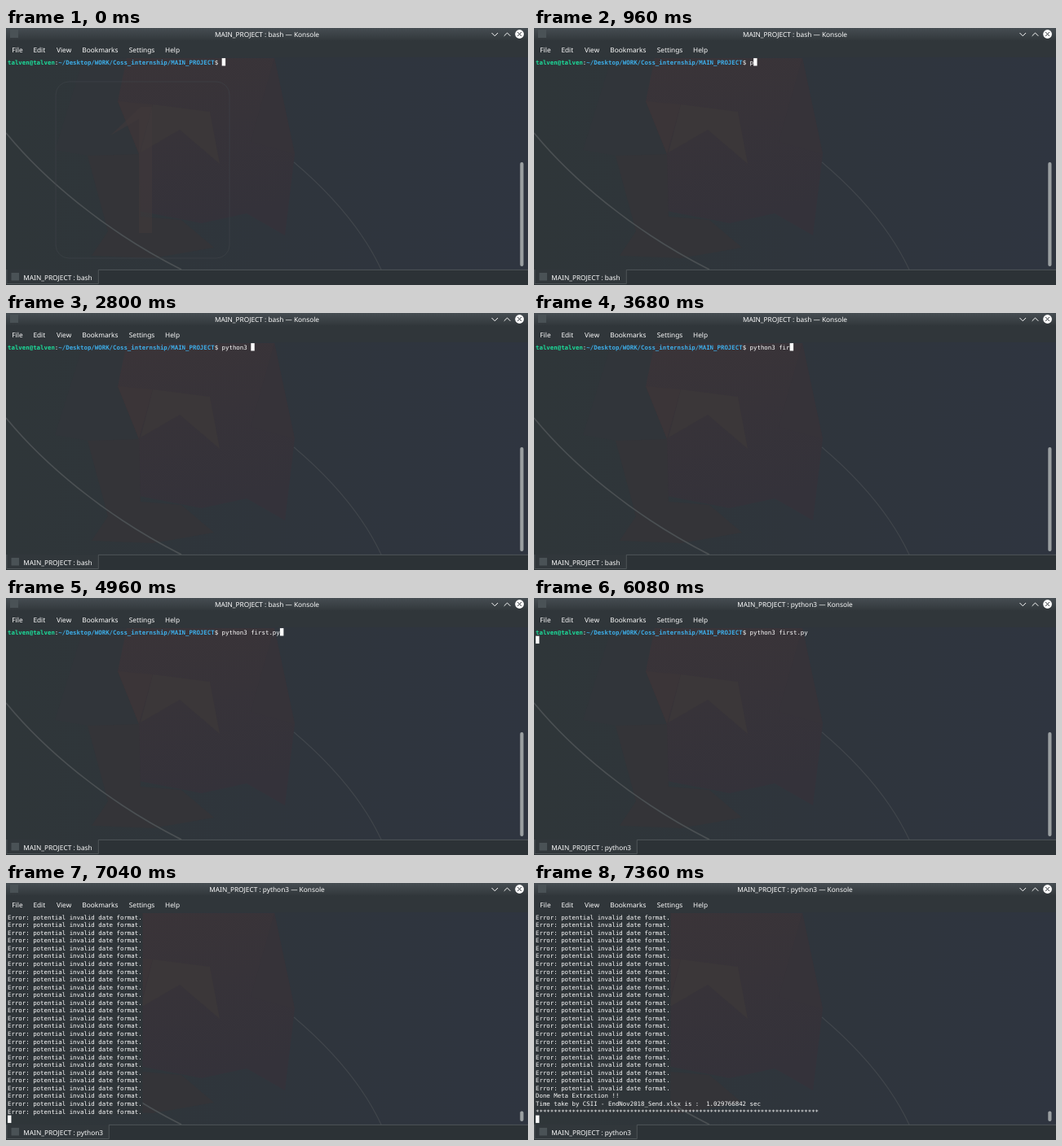
An HTML page that plays this animation: 640 px wide and 316 px high, repeating every 8 s.

```html
<!DOCTYPE html>
<html lang="en">
<head>
<meta charset="utf-8">
<title>Terminal session</title>
<style>
  html, body { margin: 0; width: 100%; height: 100%; overflow: hidden; background: #2f363a; }
  svg { display: block; width: 100%; height: 100%; }
  text { white-space: pre; text-rendering: geometricPrecision; fill: #fcfcfc; }
  .ui text { font: 8.3px "Noto Sans", sans-serif; }
  #rows text { font: 7.4px "DejaVu Sans Mono", monospace; }
  .user { fill: #1cdc9a; font-weight: bold; }
  .path { fill: #3daee9; font-weight: bold; }
</style>
</head>
<body>
<svg viewBox="0 0 640 316">
  <defs>
    <linearGradient id="bar" x2="0" y2="1">
      <stop stop-color="#464d52"/><stop offset="1" stop-color="#32383c"/>
    </linearGradient>
    <linearGradient id="wall">
      <stop stop-color="#2f3639"/><stop offset=".5" stop-color="#2f353c"/><stop offset="1" stop-color="#2f3540"/>
    </linearGradient>
    <linearGradient id="red" x2=".3" y2="1">
      <stop stop-color="#3a3438"/><stop offset="1" stop-color="#34323a"/>
    </linearGradient>
  </defs>

  <!-- wallpaper seen through the window -->
  <rect width="640" height="316" fill="#2f3639"/>
  <rect y="36" width="640" height="261" fill="url(#wall)"/>
  <path d="M95 37H150L137 90 163 155 100 157 60 150Z" fill="#31353a"/>
  <path d="M148 37H329L354 155 342 255 295 228 240 240 163 225V155L137 90Z" fill="url(#red)"/>
  <path d="M100 157L163 155 165 232 215 236 255 270 180 283 105 280 125 250Z" fill="#343438"/>
  <path d="M137 90L180 94 163 155Z" fill="#3b3538"/>
  <path d="M180 94L250 103 262 167 213 125 165 153Z" fill="#3b3739"/>
  <path d="M329 37L354 155 300 140Z" fill="#363339"/>
  <g fill="none">
    <path d="M0 129C45 184 120 249 215 297" stroke="#4b5053" stroke-width="1.7"/>
    <path d="M353 165C400 205 438 250 460 297" stroke="#41464c" stroke-width="1.1"/>
  </g>
  <g id="ghost">
    <rect x="61" y="66" width="213" height="217" rx="16" fill="none" stroke="#40454a" stroke-width=".6"/>
    <path d="M128 132L165 97H179V252H163V112Z" fill="#40393b" opacity=".6"/>
  </g>
  <rect id="flat" y="37" width="167.5" height="249" fill="#2f3539"/>

  <g class="ui">
    <rect width="640" height="15" fill="url(#bar)"/>
    <rect y="15" width="640" height="21" fill="#30363a"/>
    <rect x="5" y="2" width="10" height="10" fill="#4a5256"/>
    <text id="title" x="320" y="10.6" text-anchor="middle"></text>
    <g id="menu"></g>
    <g fill="none" stroke="#fcfcfc" stroke-width="1">
      <path d="M595.5 6L599.3 9.8 603.1 6M610.7 9.8L614.5 6 618.3 9.8"/>
      <circle cx="629.6" cy="7.5" r="5.4" fill="#fcfcfc" stroke="none"/>
      <path d="M627.2 5.1l4.8 4.8m0-4.8l-4.8 4.8" stroke="#31363b"/>
    </g>
    <rect y="297" width="640" height="19" fill="#2c3236"/>
    <path id="tab" fill="#31373b" stroke="#575d61" stroke-width=".8"/>
    <rect x="6.5" y="301" width="9.5" height="9.5" fill="#4a5256"/>
    <text id="tabName" x="21.3" y="309.7"></text>
  </g>

  <rect id="thumb" x="630.3" width="4.2" rx="2.1" fill="#9a9fa1"/>
  <g id="rows"></g>
  <rect id="cursor" width="4.45" height="9.4" fill="#fcfcfc"/>
</svg>

<script>
const $ = id => document.getElementById(id);
const LOOP = 8000, LEFT = 2, TOP = 37.1, CELL = 4.452, ROW = 9.56, BASELINE = 7.5;

const command = "python3 first.py";
const keyTimes = [960, 1120, 1280, 1440, 1600, 1920, 2080, 2800,
                  3360, 3520, 3680, 3920, 4160, 4480, 4720, 4960];
const ENTER = 5680, RUNNING = 6080, FIRST_REPORT = 6400, ERRORS = 7040, SECOND_REPORT = 7360;

const user = "talven@talven", path = "~/Desktop/WORK/Coss_internship/MAIN_PROJECT";
const promptLength = `${user}:${path}$ `.length;
const promptLine = typed =>
  `<tspan class="user">${user}</tspan>:<tspan class="path">${path}</tspan>$ ${typed}`;
const report = (file, seconds) => [
  "Done Meta Extraction !!",
  `Time take by ${file} - EndNov2018_Send.xlsx is :  ${seconds} sec`,
  "*".repeat(78)
];
const errors = count => Array(count).fill("Error: potential invalid date format.");

$("menu").innerHTML = [["File", 7.3], ["Edit", 33.4], ["View", 62], ["Bookmarks", 93.3],
                       ["Settings", 150.7], ["Help", 195]]
  .map(([label, x]) => `<text x="${x}" y="30">${label}</text>`).join("");

function linesAt(t) {
  if (t >= SECOND_REPORT) return [...errors(23), ...report("CSII", "1.029766842")];
  if (t >= ERRORS) return errors(26);
  const typed = command.slice(0, keyTimes.filter(k => k <= t).length);
  const lines = [promptLine(typed)];
  return t >= FIRST_REPORT ? [...lines, ...report("ATRC", "0.8185248010000001")] : lines;
}

let shown = "";
function drawRows(lines) {
  const markup = lines.map((line, i) =>
    `<text x="${LEFT}" y="${TOP + i * ROW + BASELINE}">${line}</text>`).join("");
  if (markup !== shown) $("rows").innerHTML = shown = markup;
}

function draw(t) {
  const lines = linesAt(t);
  drawRows(lines);

  const typing = t < ENTER;
  const column = typing ? promptLength + keyTimes.filter(k => k <= t).length : 0;
  $("cursor").setAttribute("x", LEFT + column * CELL);
  $("cursor").setAttribute("y", TOP + (typing ? 0 : lines.length) * ROW);

  const running = t >= RUNNING;
  const name = `MAIN_PROJECT : ${running ? "python3" : "bash"}`;
  $("title").textContent = `${name} — Konsole`;
  $("tabName").textContent = name;
  $("tab").setAttribute("d", `M.8 297V314.5H${running ? 126.3 : 113.3}V297.4H640`);

  const scrolled = t >= ERRORS;
  $("thumb").setAttribute("y", scrolled ? 280.5 : 165);
  $("thumb").setAttribute("height", scrolled ? 12.5 : 128);
  $("flat").setAttribute("opacity", scrolled ? 1 : 0);
  $("ghost").setAttribute("opacity", t < 80 ? 1 : t < 160 ? 0.4 : 0);
}

function tick() {
  draw(performance.now() % LOOP);
  requestAnimationFrame(tick);
}
tick();
</script>
</body>
</html>
```
